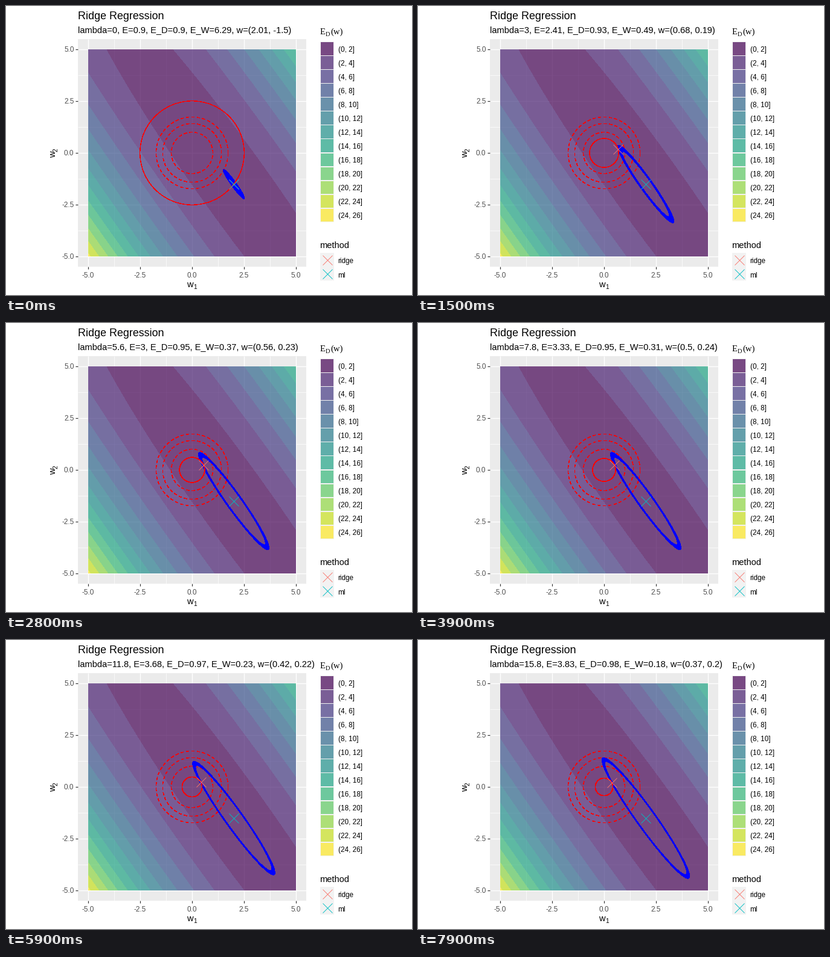
These frames come from a looping animation (672 by 480 pixels, 8 s). A matplotlib script:

```python
import numpy as np
import matplotlib.pyplot as plt
from matplotlib.animation import FuncAnimation
from matplotlib.patches import PathPatch, Rectangle
from matplotlib.path import Path

W, H, DPI = 672, 480, 96
SANS, SERIF = "Liberation Sans", "Liberation Serif"
CX, CY, UNIT = 308, 244, 34.4
RIDGE, ML = "#F8766D", "#00BFC4"
HAIR = 0.25  # without smoothing this fills about one pixel

# Quadratic error surface, described by its principal axes
N_OBS, E_MIN = 50, 0.9
THETA = 0.9508
AXES = np.array([[np.cos(THETA), -np.sin(THETA)],
                 [np.sin(THETA), np.cos(THETA)]])
EIG = np.array([0.335, 19.803])
ML_COEF = np.array([2.39, 0.75786])
W_ML = ML_COEF @ AXES

T = np.linspace(0, 2 * np.pi, 361)
CIRCLE = np.column_stack([np.cos(T), np.sin(T)])


def pt(px):
    return px * 72 / DPI


def to_px(w):
    w = np.asarray(w, float)
    return np.stack([CX + UNIT * w[..., 0], CY - UNIT * w[..., 1]], axis=-1)


def num(x, digits=2):
    return f"{round(float(x), digits) + 0.0:g}"


plt.rcParams["lines.scale_dashes"] = False
fig = plt.figure(figsize=(W / DPI, H / DPI), dpi=DPI, facecolor="white")
ax = fig.add_axes([0, 0, 1, 1])
ax.axis("off")


def text(x, y, s, size, color="black", font=SANS, **kw):
    return ax.text(x, y, s, fontsize=pt(size), color=color, family=font,
                   va="baseline", zorder=10, **kw)


def rect(x, y, w, h, color, z, **kw):
    ax.add_patch(Rectangle((x, y), w, h, facecolor=color, lw=0, zorder=z, **kw))


def line(x, y, color, width, z, **kw):
    return ax.plot(x, y, color=color, lw=pt(width), zorder=z, **kw)[0]


def cross(x, y, color, z=8):
    return ax.plot([x], [y], "x", color=color, ms=pt(15.2), mew=pt(0.9),
                   zorder=z)[0]


# Panel, grid and ticks
rect(119, 55, 378, 378, "#EBEBEB", 0)
for k in range(-4, 5):
    v = 1.25 * k
    x, y = to_px([v, v])
    major = k % 2 == 0
    width = 1.4 if major else 0.7
    line([x, x], [55, 433], "white", width, 1, solid_capstyle="butt")
    line([119, 497], [y, y], "white", width, 1, solid_capstyle="butt")
    if major:
        line([x, x], [433, 436.7], "#333333", 1.2, 2, solid_capstyle="butt")
        line([115.3, 119], [y, y], "#333333", 1.2, 2, solid_capstyle="butt")
        text(x, 451, f"{v:.1f}", 11.8, "#4D4D4D", ha="center")
        text(112.5, y + 4.4, f"{v:.1f}", 11.8, "#4D4D4D", ha="right")

# Data error in steps of two, one sample per pixel
side = int(10 * UNIT)
grid = (np.arange(side) + 0.5) / UNIT - 5
G = np.stack(np.meshgrid(grid, -grid), axis=-1)
Z = E_MIN + (((G - W_ML) @ AXES.T) ** 2 * EIG).sum(axis=-1) / N_OBS
fills = plt.get_cmap("viridis")(np.linspace(0, 1, 13))
ax.imshow(fills[(Z // 2).astype(int)], alpha=0.7, zorder=3, aspect="auto",
          interpolation="nearest", extent=(136, 136 + side, 72 + side, 72))
ax.set_xlim(0, W)
ax.set_ylim(H, 0)

for level in (1, 2, 3):
    ring = to_px(np.sqrt(level) * CIRCLE)
    line(ring[:, 0], ring[:, 1], "red", HAIR, 4, dashes=(pt(4), pt(4)),
         dash_capstyle="butt", antialiased=False)

# Titles
text(119, 22, "Ridge Regression", 17.9)
subtitle = text(119, 45, "", 14.67)
text(299.5, 467, "w", 14.67)
text(310.5, 470, "1", 10.3)
UP = dict(rotation=90, rotation_mode="anchor", ha="left")
text(82, 252.5, "w", 14.67, **UP)
text(85, 241.5, "2", 10.3, **UP)

# Legends
text(520, 47, "E", 14.67, font=SERIF)
text(529, 50, "D", 10.3, font=SERIF)
text(537, 47, "(w)", 14.67, font=SERIF)
KEY = 23.04
for i, color in enumerate(fills):
    top = 59.4 + KEY * i
    rect(520, top, KEY, KEY, "#F2F2F2", 2)
    rect(520.8, top + 0.8, KEY - 1.6, KEY - 1.6, color, 3, alpha=0.7)
    text(549.5, top + 16.6, f"({2 * i}, {2 * i + 2}]", 11.8)

text(519.5, 402, "method", 14.67)
for i, (name, color) in enumerate([("ridge", RIDGE), ("ml", ML)]):
    top = 410.2 + KEY * i
    rect(520, top, KEY, KEY, "#F2F2F2", 2)
    cross(531.5, top + KEY / 2, color)
    text(549.5, top + 17.3, name, 11.8)

# Moving parts
band = PathPatch(Path(to_px(CIRCLE)), facecolor="blue", edgecolor="blue",
                 lw=pt(0.5), zorder=5, antialiased=False)
ax.add_patch(band)
norm_ring = line([], [], "red", HAIR, 6, antialiased=False)
ridge_mark = cross(0, 0, RIDGE)
cross(*to_px(W_ML), ML, 9)


def level_ellipse(level):
    radii = np.sqrt(N_OBS * max(level - E_MIN, 0) / EIG)
    return to_px(W_ML + (CIRCLE * radii) @ AXES)


def update(n):
    lam = 0.2 * n
    coef = ML_COEF * EIG / (EIG + lam)
    w = coef @ AXES
    e_d = E_MIN + (EIG * (coef - ML_COEF) ** 2).sum() / N_OBS
    e_w = w @ w
    subtitle.set_text(
        f"lambda={num(lam, 1)}, E={num(e_d + lam * e_w)}, E_D={num(e_d)}, "
        f"E_W={num(e_w)}, w=({num(w[0])}, {num(w[1])})")

    # Every point whose error rounds to the shown value
    shown = round(e_d, 2)
    band.set_path(Path.make_compound_path(
        Path(level_ellipse(shown + 0.005)),
        Path(level_ellipse(shown - 0.005)[::-1])))

    # The same tolerance gives the ring its width
    radius = np.sqrt(e_w)
    ring = to_px(radius * CIRCLE)
    norm_ring.set_data(ring[:, 0], ring[:, 1])
    norm_ring.set_linewidth(pt(HAIR + 0.005 * UNIT / radius))

    x, y = to_px(w)
    ridge_mark.set_data([x], [y])
    return subtitle, band, norm_ring, ridge_mark


anim = FuncAnimation(fig, update, frames=80, interval=100, repeat=True,
                     repeat_delay=0, blit=False)
plt.show()
```
